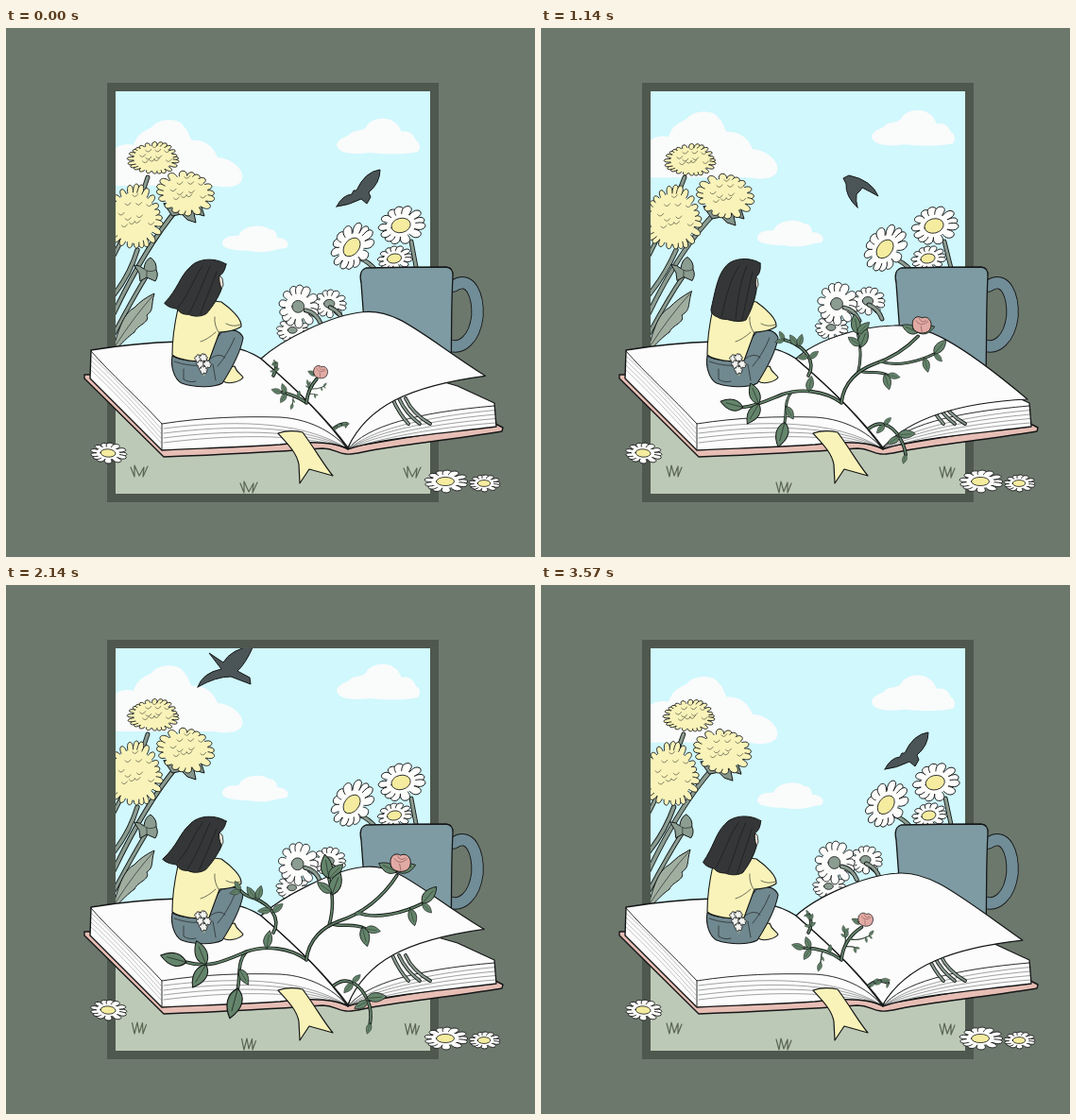
An HTML page with a canvas for the animation above (3710 ms loop, 560 by 560 pixels).

```html
<!DOCTYPE html>
<html>
<head>
<meta charset="utf-8">
<style>
html, body { margin: 0; height: 100%; overflow: hidden; background: #6d786d }
canvas { display: block }
</style>
</head>
<body>
<canvas width="560" height="560"></canvas>
<script>
const c = document.querySelector('canvas').getContext('2d');
const INK = '#151717', PAPER = '#fbfcfb', LEMON = '#f9f3b9', SAGE = '#8b9c90', LEAF = '#64856b', PINK = '#e2aaa4';
const LOOP = 3710, STEP = 1000 / 7, STEPS = 26;
c.lineJoin = c.lineCap = 'round';

// Values over the loop as [step, value] pairs
const WIND = [[0, .95], [2, 1.05], [4, .95], [8, 0], [12, .65], [15, 1.1], [17, 1.1], [21, .65], [23, .5], [25, .65], [26, .95]];
const SWAY = [[0, 0], [4, .5], [6, .65], [8, .5], [12, 0], [15, 0], [18, .55], [21, 1], [25, .2], [26, 0]];
const GROW = [[0, .2], [4, .57], [8, .8], [12, 1], [15, .97], [21, .63], [25, .3], [26, .2]];
const GRASS = [[0, 1], [4, -.5], [8, 0], [12, 0], [15, -.5], [21, 0], [25, 0], [26, 1]];

const BIRD = [
  [0, 'M350,189 Q356,177 366,176 L368,172 L371,172 Q380,152 396,150 Q396,164 384,174 L386,179 L382,186 L376,181 Q362,188 350,189Z'],
  [4, 'M330,163 Q342,173 356,173 L361,170 L364,172 Q376,166 380,155 Q381,172 371,180 L368,183 L370,188 L362,187 Q340,187 330,163Z'],
  [8, 'M335,190 Q322,178 323,165 L320,159 L326,156 Q350,161 357,178 Q348,173 340,169 L338,172 L336,174 L334,176 Q333,183 335,190Z'],
  [12, 'M255,149 Q262,132 279,130 L269,121 L277,120 Q292,109 314,107 Q308,124 296,133 L305,143 L303,145 L290,139 Q270,140 255,149Z'],
  [15, 'M203,108 Q208,93 228,89 L215,72 L230,82 Q238,68 262,64 Q254,83 245,91 L258,98 L259,105 L238,97 Q222,97 203,108Z']
];
const HAIR = [
  'M232,249 C222,242 202,243 195,253 C187,262 184,280 180,298 C180,303 184,305 187,306 C191,309 196,308 199,309 C206,311 213,311 217,309 C222,300 226,290 228,278 C227,270 227,266 228,263 C231,261 233,256 232,249Z',
  'M233,250 C222,243 203,243 194,254 C184,263 182,276 167,291 C172,296 177,296 181,297 C184,302 188,303 193,303 C200,306 207,305 212,302 C219,294 225,285 228,276 C226,270 225,266 226,262 C229,261 232,256 233,250Z'
];
const STRANDS = [
  'M210,252 C200,265 196,285 191,306 M218,252 C210,270 208,290 206,308 M224,258 C220,275 217,290 213,309',
  'M208,252 C198,265 195,280 182,295 M216,252 C208,270 203,285 193,302 M223,258 C217,275 210,290 205,303'
];
const PAGE = [
  'M270,350 C290,331 335,316 373,315 C405,313 440,330 515,393 C455,396 395,408 362,444 C344,420 312,386 270,350Z',
  'M270,350 C292,330 345,303 378,300 C415,296 440,325 507,367 C425,378 382,400 362,444 C344,420 312,386 270,350Z'
];

const lerp = (a, b, t) => a + (b - a) * t;
const NUM = /-?[\d.]+/g;
function morph(a, b, t) {
  const n = b.match(NUM);
  let i = 0;
  return a.replace(NUM, x => lerp(+x, +n[i++], t));
}
function at(keys, i, mix = lerp) {
  const k = Math.max(1, keys.findIndex(p => p[0] >= i));
  const [a, u] = keys[k - 1], [b, v] = keys[k];
  return mix(u, v, (i - a) / (b - a));
}

function draw(d, fill, width = 1.1, ink = INK) {
  const p = new Path2D(d);
  if (fill) { c.fillStyle = fill; c.fill(p); }
  if (width) { c.lineWidth = width; c.strokeStyle = ink; c.stroke(p); }
}
function tube(d, color, width) {
  draw(d, null, width + 1.8, INK);
  draw(d, null, width, color);
}
function oval(x, y, rx, ry, fill, width = .8) {
  draw(`M${x - rx},${y} a${rx},${ry} 0 1 1 ${2 * rx},0 a${rx},${ry} 0 1 1 ${-2 * rx},0Z`, fill, width);
}
function place(x, y, turn, size, fn) {
  c.save();
  c.translate(x, y);
  c.rotate(turn * Math.PI / 180);
  c.scale(size, size);
  fn();
  c.restore();
}

function petals(x, y, rx, ry, n, fill, clear) {
  for (let i = 0; i < n; i++) {
    const a = (i + .25 * Math.sin(i * 5)) / n * 2 * Math.PI, far = .95 + .06 * Math.sin(i * 7), w = 4 / n;
    const p = (r, da) => `${x + rx * r * Math.cos(a + da)},${y + ry * r * Math.sin(a + da)}`;
    draw(`M${p(.2, 0)} C${p(.6, -w)} ${p(far, -w)} ${p(far, 0)} C${p(far, w)} ${p(.6, w)} ${p(.2, 0)}Z`, fill, .9);
  }
  oval(x, y, rx * clear, ry * clear, fill, 0);
}
function daisy(x, y, rx, ry, tilt = 0, core = '#f5ec9f', size = .38) {
  place(x, y, tilt, 1, () => {
    petals(0, 0, rx, ry, 13, '#fdfdfc', .58);
    oval(0, 0, rx * size, ry * size, core);
  });
}
function dandelion(x, y, rx, ry, n) {
  petals(x, y, rx, ry, n, LEMON, .74);
  for (let i = 0; i < 11; i++) {
    const r = .2 + .42 * (i % 3) / 2, a = i * 2.4;
    draw(`M${x + rx * r * Math.cos(a) - 3},${y - 2 + ry * r * Math.sin(a)} q3,4 6,-1`, null, .5);
  }
}

function clouds(i) {
  const dy = -6.4 * (1 - Math.cos(i / STEPS * 2 * Math.PI));
  const cloud = (d, k) => place(0, dy * k, 0, 1, () => draw(d, '#fafbfb', 0));
  cloud('M105,167 L108,140 C112,125 125,121 135,124 C140,108 152,108 155,104 C162,95 184,95 188,104 C194,109 193,114 197,119 C210,117 220,126 224,137 C240,138 253,151 250,160 C248,168 235,170 220,167Z', 1);
  cloud('M350,124 C351,117 359,116 363,113 C367,107 377,110 381,105 C386,94 404,94 410,99 C416,102 417,107 419,110 C428,108 432,114 434,119 C439,121 439,129 436,131 C425,134 400,134 385,132 C370,134 352,134 350,124Z', 1);
  cloud('M229,229 C228,222 238,219 246,220 C250,210 268,206 279,213 C285,213 287,218 287,222 C298,222 302,230 296,233 C284,234 280,238 266,237 C250,235 232,236 229,229Z', .65);
}

function bird(i) {
  let d = BIRD[0][1], x = 0, y = 0;
  if (i > 18 && i < 23) return;
  if (i > 22) { x = 14 * (STEPS - i); y = 6 * (STEPS - i); }
  else if (i > 15) { d = BIRD[4][1]; x = -17 * (i - 15); y = -15 * (i - 15); }
  else d = at(BIRD, i, morph);
  place(x, y, 0, 1, () => draw(d, '#4b5557', 1));
}

function dandelions(s) {
  tube(`M${150 + 4 * s},158 Q138,195 112,245`, SAGE, 3);
  tube(`M${181 + 9 * s},${192 + 5 * s} Q145,235 108,315`, SAGE, 3.5);
  tube(`M${139 + 8 * s},235 Q130,265 108,290`, SAGE, 3.5);
  tube(`M${149 + 4 * s},262 Q132,290 110,332`, SAGE, 3);
  draw(`M112,345 C120,315 125,302 136,296 Q144,287 ${157 + 5 * s},${281 - 5 * s} C${153 + 4 * s},295 ${157 + 3 * s},298 149,304 C153,312 139,314 136,322 C130,326 122,334 112,345Z`, '#a0aea0', 1);
  draw(`M${155 + 5 * s},${284 - 5 * s} Q136,305 116,336`, null, .6);
  place(4 * s, -s, 0, 1, () => {
    draw('M136,251 Q142,251 146,255 Q147,246 153,243 Q160,248 159,256 Q162,262 158,268 L149,264 L142,268 L141,260Z', SAGE, 1);
    draw('M146,255 Q151,260 159,256 M149,264 L149,257', null, .6);
  });
  place(10 * s, 6 * s, 0, 1, () => {
    draw('M167,186 L176,199 L186,197 L192,203 L201,206 L199,196 L210,199 L206,186Z', '#84958b', 1);
    dandelion(190, 175, 32, 25, 18);
  });
  dandelion(156 + 4 * s, 138 + 4 * s, 28, 18, 24);
  dandelion(135 + 9 * s, 201 + 2 * s, 32, 36, 25);
}

function mug(s) {
  tube(`M${373 - 4 * s},243 Q384,247 393,258`, SAGE, 3);
  tube(`M${429 - 4 * s},226 L435,258`, SAGE, 3);
  daisy(411 - 3 * s, 244, 20, 13, -10);
  daisy(366 - 4 * s, 232 + 4 * s, 29, 20, -52);
  daisy(418 - 4 * s, 209 + s, 27, 20, -14);
  tube('M474,273 C492,261 500,284 499,305 C496,330 482,340 470,336', '#718d97', 11.5);
  draw('M381,254 Q423,253 466,253 Q474,254 473,263 C471,300 472,330 471,365 L383,365 L376,270 Q373,257 381,254Z', '#7e9ba3', 1.3);
}

function book(w) {
  place(4 * (1 - w), -3 * (1 - w), 0, 1, () => {
    daisy(303, 320, 19, 13, 0, SAGE, .26);
    daisy(342, 292, 19, 15, 0, SAGE, .3);
    daisy(309, 295, 23, 23, 0, SAGE, .28);
    tube('M317,299 Q328,301 333,313', SAGE, 3);
    tube('M343,296 Q353,300 357,311', SAGE, 3);
  });
  draw('M83,367 L90,367 L362,444 L516,418 L526,423 L525,427 C470,436 420,441 393,446 C375,449 368,452 360,451 C350,450 347,445 335,445 C280,449 220,452 167,454 L83,371Z', '#e7beb5', 1.4);
  draw('M362,446 L375,400 L440,368 L478,379 L517,397 L519,422 C465,429 395,434 362,446Z', PAPER, 1.3);
  draw('M362,446 C382,421 435,407 517,400', null, .9);
  for (let k = 1; k < 5; k++)
    draw(`M364,445 C385,${422 + k * 4} 440,${408 + k * 4} 518,${400 + k * 4.5}`, null, .4);
  for (const [x, tx] of [[409, 426], [416, 438], [423, 449]])
    tube(`M${x},392 Q${x + 7},408 ${tx},419`, SAGE, 2);
  draw('M90,341 C120,336 150,333 184,332 C220,331 252,338 270,350 C312,386 344,420 362,446 C346,437 315,438 290,441 C245,444 205,445 165,447 L89,371Z', PAPER, 1.4);
  draw('M90,342 C110,365 140,392 165,419 C210,412 250,411 290,412 C325,414 350,431 362,446 M165,419 L165,446', null, .9);
  for (let k = 1; k < 5; k++) {
    draw(`M167,${419 + k * 5} C230,${411 + k * 5} 310,${408 + k * 5} 361,445`, null, .4);
    draw(`M90,${342 + k * 5} Q125,${375 + k * 5} 164,${419 + k * 5}`, null, .25);
  }
  draw(morph(...PAGE, w), PAPER, 1.2);
  draw('M288,429 C298,440 308,450 310,462 L311,482 L321,467 L346,474 C336,462 330,450 314,428 Q300,425 288,429Z', LEMON, 1.2);
}

function girl(w) {
  draw('M236,359 C234,365 227,370 230,374 C236,378 248,374 251,370 C249,366 244,365 242,358Z', LEMON);
  draw('M176,347 C174,358 178,372 186,376 C200,381 220,381 229,376 C238,362 248,345 251,328 C248,320 238,317 228,322 C221,330 217,340 214,352 C203,354 185,352 176,347Z', '#70888f');
  draw('M178,353 Q197,360 216,356 M188,361 L188,372 Q195,376 201,374 M219,356 L222,373 M242,328 Q235,345 224,358 M216,350 Q226,343 232,349', null, .6);
  draw('M182,297 C178,315 176,330 176,346 C183,352 203,354 215,352 L226,322 C232,322 244,320 249,316 C250,308 238,297 228,290 L212,288Z', LEMON);
  draw('M225,322 Q220,314 221,306 M206,332 Q213,330 222,322 M233,313 Q240,317 248,314', null, .6);
  draw('M224,260 L229,265 L230,272 L226,281 L216,286Z', '#f5e6d8', .8);
  draw(morph(...HAIR, w), '#343637', 1);
  draw(morph(...STRANDS, w), null, .5, '#101112');
  draw('M203,352 L209,368 M208,352 L210,368 M213,356 L210,368', null, 1.5, SAGE);
  for (const [x, y] of [[204, 350], [209, 349], [206, 356], [213, 356], [209, 362]]) petals(x, y, 4.5, 4.5, 6, '#f4f4f2', .6);
}

const ruler = {};
function measure(d) {
  if (!ruler[d]) {
    ruler[d] = document.createElementNS('http://www.w3.org/2000/svg', 'path');
    ruler[d].setAttribute('d', d);
  }
  return ruler[d];
}
function leaf(x, y, turn, size) {
  place(x, y, turn, size, () => {
    draw('M0,0 C5,-8 14,-8 24,0 C15,7 6,7 0,0Z', LEAF, .9);
    draw('M1,0 L18,0', null, .5);
  });
}
// Leaves: [position, angle, size]; twigs: [position, path, leaves]
function vine(g, d, leaves, twigs = []) {
  const path = measure(d), len = path.getTotalLength();
  const point = u => path.getPointAtLength(len * u * g);
  for (const [u, ...twig] of twigs) {
    const p = point(u);
    place(p.x, p.y, 0, g, () => vine(1, ...twig));
  }
  c.setLineDash([len * g, 999]);
  tube(d, LEAF, 1.8);
  c.setLineDash([]);
  for (const [u, turn, size] of leaves) {
    const p = point(u);
    leaf(p.x, p.y, turn, size * (.25 + .75 * g));
  }
  return point(1);
}
function plant(g) {
  vine(g, 'M283,368 C292,352 278,338 264,332 C255,330 250,326 247,322',
    [[1, -120, .5], [1, 165, .5], [.72, -125, .65], [.68, -75, .65], [.35, -40, .6], [.4, 175, .6]]);
  vine(g, 'M347,424 C362,412 376,424 383,440 C388,452 386,460 385,466',
    [[.3, -45, .5], [.3, 130, .6], [.62, -5, .9], [.66, 150, .7], [1, 105, .5]]);
  vine(g, 'M317,396 C300,384 275,381 255,388 C235,396 215,408 187,398',
    [[1, 195, 1.2], [.84, -112, 1.15], [.84, 120, 1.2], [.33, -80, .8]],
    [[.5, 'M0,0 C-10,12 -6,25 -9,40', [[1, 105, 1.4], [.5, 60, .8]]]]);
  const tip = vine(g, 'M318,397 C320,375 336,362 352,356 C385,345 403,325 416,304',
    [[.55, -15, .35]],
    [[.33, 'M0,0 C6,-20 4,-36 0,-52', [[1, -100, 1.1], [1, -45, .9], [.65, -70, 1.1], [.7, 215, .8]]],
     [.58, 'M0,0 C20,8 50,0 70,-10', [[1, -50, 1], [1, 45, .6], [.8, 75, .8]]],
     [.36, 'M0,0 C12,4 22,-2 36,5', [[1, 10, .7], [.9, 75, .9]]]]);
  leaf(tip.x, tip.y - 4, -20, .3 + .6 * g);
  leaf(tip.x, tip.y - 4, 205, .3 + .6 * g);
  place(tip.x + 2, tip.y - 4 * g, 16 - 10 * g, .65 + .4 * g, () => {
    draw('M-8,-4 C-13,-14 -6,-20 0,-17 C5,-21 14,-15 10,-5 C6,1 -4,1 -8,-4Z', PINK, .9);
    draw('M-6,-13 Q0,-6 7,-14 M-3,-16 Q1,-10 5,-15 M0,-8 L2,-2', null, .6, '#7d4f4d');
  });
}

function tuft(x, y, k) {
  draw(`M${x - 8 - k},${y - 5 + k} L${x - 5},${y + 6} L${x - 3 - 2 * k},${y - 6} L${x},${y + 5} L${x + 4 + k},${y - 5 + k} L${x + 4},${y + 6} L${x + 8 + k},${y - 4 - k}`, null, 1.2, '#596652');
}

function scene(i) {
  const w = at(WIND, i), s = at(SWAY, i), k = at(GRASS, i);
  c.fillStyle = '#6d786d';
  c.fillRect(0, 0, 560, 560);
  c.fillStyle = '#4f584e';
  c.fillRect(107, 58, 351, 444);
  c.save();
  c.beginPath();
  c.rect(116, 67, 333, 426);
  c.clip();
  c.fillStyle = '#d0f8fd';
  c.fillRect(116, 67, 333, 426);
  c.fillStyle = '#bdc9b7';
  c.fillRect(116, 390, 333, 103);
  clouds(i);
  bird(i);
  dandelions(s);
  tuft(141, 469, k);
  tuft(257, 486, k);
  tuft(430, 470, k);
  c.restore();
  mug(s);
  book(w);
  girl(w);
  plant(at(GROW, i));
  daisy(108, 450, 21, 11, 4);
  daisy(465, 480, 25, 12);
  daisy(506, 482, 18, 9);
}

function tick() {
  const t = performance.now() % LOOP;
  scene(Math.min(STEPS - 1, Math.floor((t + 5) / STEP)));
  requestAnimationFrame(tick);
}
tick();
</script>
</body>
</html>
```
